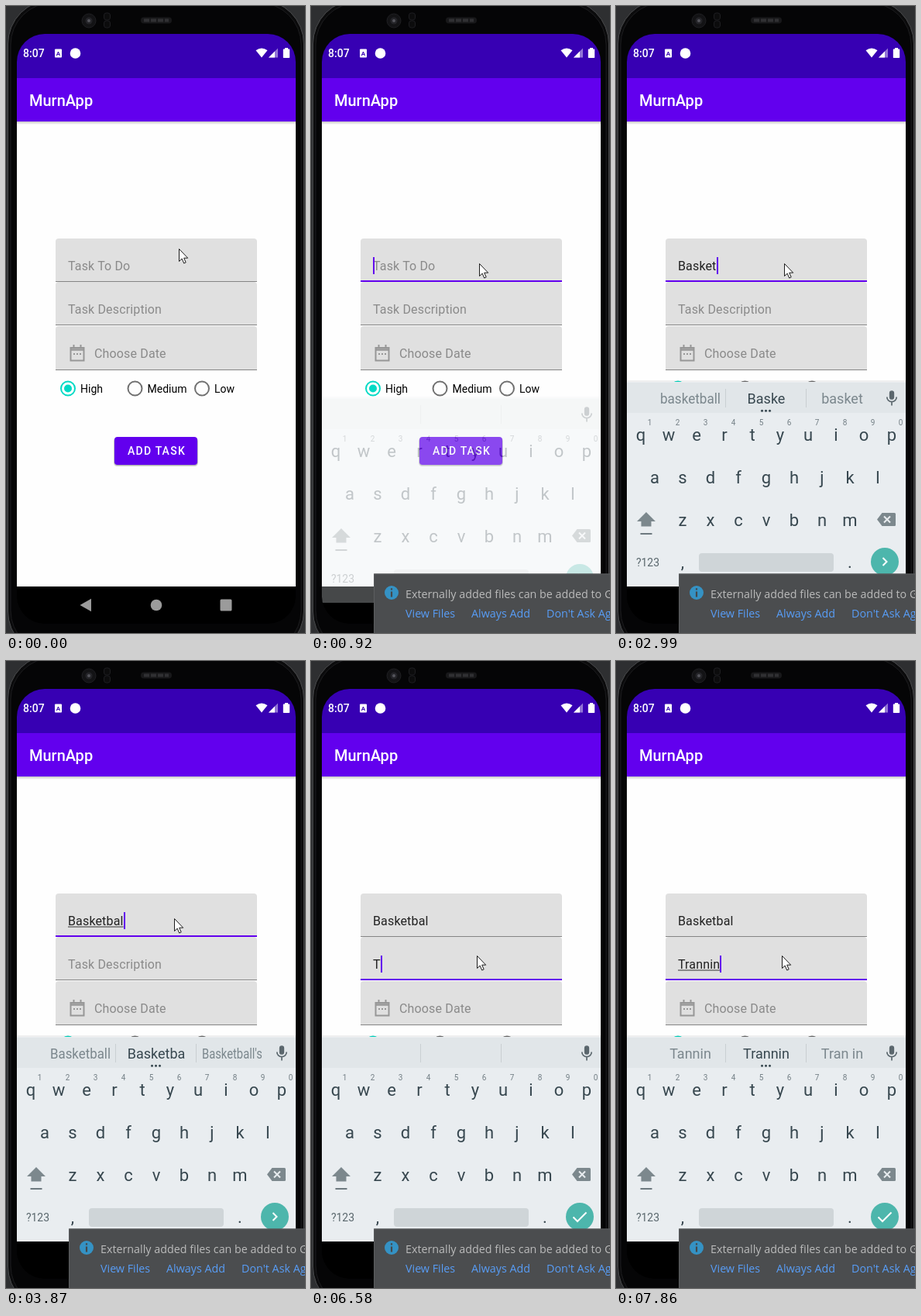
An HTML page that plays this animation: 386 px wide and 809 px high, repeating every 7990 ms.

```html
<!DOCTYPE html>
<html lang="en">
<head>
<meta charset="utf-8">
<title>Task form</title>
<style>
  html, body { margin: 0; width: 100%; height: 100%; overflow: hidden; background: #2b2c2e; }
  svg { display: block; width: 100vw; height: 100vh; font-family: Roboto, sans-serif; }
  text { white-space: pre; }
  .mid { text-anchor: middle; }
  .input { font-size: 16px; letter-spacing: .15px; }
  .hint { fill: #8a8a8a; }
  .typed { fill: #212121; }
  .label { font-size: 14px; fill: #000; }
  .key { font-size: 22px; fill: #37474f; }
  .digit { font-size: 10px; fill: #727e84; }
  .word { font-size: 18px; fill: #7b878d; }
  .notice { font: 14.3px "Open Sans", "Noto Sans", sans-serif; fill: #bbb; }
  .link { fill: #589df6; }
</style>
</head>
<body>
<svg viewBox="0 0 386 809" preserveAspectRatio="none">
  <defs>
    <linearGradient id="shade" x2="0" y2="1">
      <stop offset="0" stop-opacity=".22"/><stop offset="1" stop-opacity="0"/>
    </linearGradient>
    <clipPath id="screen"><rect x="14" y="36" width="360" height="761" rx="36"/></clipPath>
  </defs>

  <!-- phone body -->
  <rect width="386" height="809" fill="#2e2f31"/>
  <rect x="2.5" y="-8" width="382" height="846" rx="57" fill="#0b0b0c" stroke="#4b4c4e"/>
  <rect x="6" y="-4" width="375" height="838" rx="54" fill="#050506" stroke="#1d1d1f"/>
  <circle cx="107" cy="19" r="9" fill="#131315" stroke="#1f1f22"/>
  <circle cx="107" cy="19" r="4.5" fill="#242428"/>
  <circle cx="107" cy="19" r="2" fill="#55555c"/>
  <g fill="#0c0c0d" stroke="#1e1e21">
    <rect x="126.500" y="9" width="8" height="9" rx="3"/>
    <rect x="126.500" y="19" width="8" height="9" rx="3"/>
  </g>
  <rect x="174" y="14.500" width="40" height="8" rx="4" fill="#18181a"/>
  <path d="M178 18.500h32" stroke="#303033" stroke-width="4" stroke-dasharray="7 2"/>

  <g clip-path="url(#screen)">
    <rect x="14" y="36" width="360" height="761" fill="#000"/>
    <rect x="14" y="149" width="360" height="600" fill="#fefefe"/>
    <rect x="14" y="149" width="360" height="4" fill="url(#shade)"/>
    <rect x="14" y="36" width="360" height="57" fill="#3700b3"/>
    <rect x="14" y="93" width="360" height="56" fill="#6200ee"/>
    <g fill="#fff">
      <text x="22" y="66" font-size="14" font-weight="500">8:07</text>
      <rect x="63" y="55.500" width="9" height="11" rx="1"/>
      <circle cx="89.500" cy="61" r="6.800"/>
      <path d="M322.500 57.200Q330 51.800 337.500 57.200L330 66.500Z"/>
      <path d="M351 54.500V66.500H339Z" opacity=".45"/>
      <path d="M347 58.500V66.500H339Z"/>
      <path d="M360 54h4v1.500h1.500q.7 0 .7.800v10q0 .7-.7.700h-7q-.7 0-.7-.700v-10q0-.8.700-.800h1.500Z"/>
      <text x="30" y="129" font-size="20" font-weight="500">MurnApp</text>
    </g>
    <text x="67.500" y="64.200" class="mid" font-size="8" font-weight="700" fill="#3700b3">A</text>
    <g fill="#9b9b9b">
      <path d="M95.500 773L110 764.800V781.200Z"/>
      <circle cx="194" cy="773" r="7.300"/>
      <rect x="276.500" y="765.500" width="15" height="15" rx="1.500"/>
    </g>
    <g id="form"></g>
    <g id="keyboard">
      <rect x="14" y="483" width="360" height="3" fill="#000" opacity=".06"/>
      <rect x="14" y="485" width="360" height="264" fill="#e9edf0"/>
      <rect x="14" y="486" width="360" height="39" fill="#e1e6e9"/>
      <path d="M141.500 494V518M245.500 494V518" stroke="#c9cfd2"/>
      <g fill="none" stroke="#5b676d" stroke-width="1.700">
        <rect x="353.700" y="497" width="4.600" height="10" rx="2.300" fill="#5b676d"/>
        <path d="M349.800 504.500a6.200 6.200 0 0 0 12.400 0M356 511v4.500"/>
      </g>
      <g id="words"></g>
      <g id="keys"></g>
      <path d="M39 653L51 665H45.500V671.500H32.500V665H27Z" fill="#7c888d"/>
      <rect x="31.500" y="680" width="15" height="2" fill="#6d797f"/>
      <path d="M343.500 654H359.500q1.500 0 1.500 1.500V669.500q0 1.500-1.500 1.500H343.500L337 662.500Z" fill="#7c888d"/>
      <path d="M346 658.500l8 8m0-8l-8 8" stroke="#e9edf0" stroke-width="2"/>
      <rect x="107" y="706" width="174" height="24" rx="4" fill="#cfd5d8"/>
      <circle cx="347" cy="717" r="18" fill="#4db6ac"/>
      <path id="enter" fill="none" stroke="#fff" stroke-width="2"/>
    </g>
  </g>

  <g id="notice">
    <rect x="81" y="732.500" width="305" height="77" fill="#4b4d4f"/>
    <path d="M81.500 809V733H386" fill="none" stroke="#5b5d5f"/>
    <circle cx="104" cy="757" r="9" fill="#3592c4"/>
    <path d="M104 751.200v2.300M104 755.500v7" stroke="#45494c" stroke-width="2.200"/>
    <text class="notice" x="122" y="763.500">Externally added files can be added to Git</text>
    <text class="notice link" x="122" y="789">View Files</text>
    <text class="notice link" x="207" y="789">Always Add</text>
    <text class="notice link" x="304" y="789">Don't Ask Again</text>
  </g>
  <path id="mouse" d="M.5.500V16.500L4.200 13.100L6.700 19L9.200 17.900L6.700 12.200H11.700Z" fill="#fff" stroke="#1c1c1c"/>
</svg>

<script>
const LOOP = 7990;
const $ = id => document.getElementById(id);

function add(parent, tag, attrs, content = "") {
  const el = document.createElementNS("http://www.w3.org/2000/svg", tag);
  for (const k in attrs) el.setAttribute(k, attrs[k]);
  el.textContent = content;
  parent.append(el);
  return el;
}
const set = (el, attrs) => { for (const k in attrs) el.setAttribute(k, attrs[k]); };
const show = (el, on) => el.setAttribute("visibility", on ? "inherit" : "hidden");

// form
const form = $("form");

function box(y, height) {
  add(form, "path", {
    d: `M64 ${y + height}V${y + 4}q0-4 4-4H320q4 0 4 4V${y + height}Z`, fill: "#e0e0e0"
  });
}

function makeField(y, hint) {
  box(y, 56);
  add(form, "rect", { x: 64, y: y + 55, width: 260, height: 1, fill: "#858585" });
  return {
    focus: add(form, "rect", { x: 64, y: y + 54, width: 260, height: 2, fill: "#6200ee" }),
    hint: add(form, "text", { x: 80, y: y + 41, class: "input hint" }, hint),
    text: add(form, "text", { x: 80, y: y + 41, class: "input typed" }),
    under: add(form, "rect", { x: 80, y: y + 42.5, height: 1, fill: "#333" }),
    caret: add(form, "rect", { y: y + 24, width: 2, height: 22, fill: "#6200ee" })
  };
}

const task = makeField(300, "Task To Do");
const about = makeField(356, "Task Description");

box(413, 57);
add(form, "rect", { x: 64, y: 469, width: 260, height: 1, fill: "#858585" });
add(form, "text", { x: 114, y: 453.5, class: "input hint" }, "Choose Date");
add(form, "path", {
  d: "M83.500 441h17v16.500h-17zM87.500 437v4M96.500 437v4", fill: "none", stroke: "#979797", "stroke-width": 2
});
add(form, "path", {
  d: "M83 443.500h18M86.500 449h11", stroke: "#979797", "stroke-width": 2.4, "stroke-dasharray": "18 0"
}).setAttribute("d", "M83 443.500h18");
for (const x of [87, 91, 95]) add(form, "rect", { x, y: 448, width: 2, height: 2, fill: "#979797" });

[["High", 80], ["Medium", 166.5], ["Low", 253]].forEach(([name, cx], i) => {
  const color = i ? "#707070" : "#03dac5";
  add(form, "circle", { cx, cy: 493.5, r: 9, fill: "none", stroke: color, "stroke-width": 2 });
  if (!i) add(form, "circle", { cx, cy: 493.5, r: 5, fill: color });
  add(form, "text", { x: cx + 16, y: 499, class: "label" }, name);
});

for (const grow of [2, 1]) {
  add(form, "rect", {
    x: 140 - grow / 2, y: 557, width: 107 + grow, height: 35 + grow, rx: 4.5, opacity: .16
  });
}
add(form, "rect", { x: 140, y: 556, width: 107, height: 36, rx: 4, fill: "#6200ee" });
add(form, "text", {
  x: 157, y: 579, fill: "#fff", "font-size": 14, "font-weight": 500, "letter-spacing": 1.25
}, "ADD TASK");

// keyboard
const keys = $("keys");
[["qwertyuiop", 32, 561], ["asdfghjkl", 50, 616], ["zxcvbnm", 86, 671]].forEach(([row, x, y], r) => {
  [...row].forEach((c, i) => {
    add(keys, "text", { x: x + 36 * i, y, class: "key mid" }, c);
    if (!r) add(keys, "text", { x: 43.5 + 36 * i, y: 541, class: "digit mid" }, (i + 1) % 10);
  });
});
add(keys, "text", { x: 41, y: 722.5, class: "mid", "font-size": 14, fill: "#59666c" }, "?123");
add(keys, "text", { x: 86, y: 725, class: "key mid" }, ",");
add(keys, "text", { x: 302, y: 725, class: "key mid" }, ".");

const slots = [0, 1, 2].map(i => add($("words"), "text", { class: "word mid" }));
slots[1].style.fill = "#37474f";
const dots = add($("words"), "g", { fill: "#37474f" });
for (const cx of [188.5, 193.5, 198.5]) add(dots, "circle", { cx, cy: 522.3, r: 1.5 });

// timelines: [start, value], each value holds until the next start
const typedTask = [[0, ""], [1870, "B"], [2110, "Ba"], [2360, "Bas"], [2600, "Bask"], [2870, "Baske"],
  [2990, "Basket"], [3480, "Basketb"], [3750, "Basketba"], [3870, "Basketbal"]];
const typedAbout = [[0, ""], [6580, "T"], [6860, "Tr"], [6980, "Tra"], [7250, "Tran"],
  [7490, "Trann"], [7610, "Tranni"], [7740, "Trannin"]];
const offers = [[0, ""], [1990, "But B By"], [2230, "Bad Ba Back"], [2480, "Basic Bas Based"],
  [2720, "basketball Bask basket"], [2990, "basketball Baske basket"], [3110, "Basketball Basket Baskets"],
  [3600, "Basketball Basketb Basketball's"], [3870, "Basketball Basketba Basketball's"],
  [3990, "Basketball Basketbal Basketball's"], [5260, ""],
  [6710, "The T To"], [6980, "Try Tr Trust"], [7100, "Track Tra Training"], [7370, "Train Tran Transport"],
  [7610, "Train Trann Trans"], [7740, "Tannin Tranni Train"], [7860, "Tannin Trannin Tran_in"]];
const caretOn = [[0, 0], [660, 1], [1170, 0], [1730, 1], [4490, 0], [5010, 1], [5790, 0], [6190, 1]];
const focusIn = [[0, 0], [530, .4], [660, .8], [780, 1]];
const rise = [[0, null], [920, .3], [1050, .75], [1170, 1]];
const pointer = [[0, [223, 313]], [130, [220, 324]], [250, [217, 332]], [4360, [217, 340]],
  [4490, [216, 358]], [4610, [215, 372]], [4730, [214, 380]]];
const SWITCH = 5260;

function at(line, t) {
  let value = line[0][1];
  for (const [start, v] of line) if (t >= start) value = v;
  return value;
}

function drawField(f, text, focus, caret, marked) {
  f.text.textContent = text;
  const width = text ? f.text.getComputedTextLength() : 0;
  show(f.hint, !text);
  set(f.focus, { opacity: focus });
  set(f.under, { width });
  show(f.under, marked);
  set(f.caret, { x: 80 + Math.round(width) });
  show(f.caret, caret);
}

// long words are condensed to the slot width, as the keyboard does
function drawWords(line) {
  const words = line ? line.split(" ") : [];
  slots.forEach((slot, i) => {
    slot.textContent = (words[i] || "").replace("_", " ");
    const width = words[i] ? slot.getComputedTextLength() : 1;
    const scale = Math.min(1, 78 / width);
    set(slot, { transform: `translate(${96 + 98 * i} 513) scale(${scale} 1)` });
  });
  show(dots, words.length);
}

function draw(t) {
  const second = t >= SWITCH;
  const caret = at(caretOn, t);
  drawField(task, at(typedTask, t), second ? 0 : at(focusIn, t), caret && !second, t >= 3870 && !second);
  drawField(about, at(typedAbout, t), second ? 1 : 0, caret && second, t >= 7610);
  drawWords(at(offers, t));

  const up = at(rise, t);
  show($("keyboard"), up !== null);
  set($("keyboard"), { opacity: up || 0, transform: `translate(0 ${30 * (1 - up)})` });
  set($("enter"), { d: second ? "M338.500 717.500l5.500 5.500 11.500-11.500" : "M344.500 712l5 5-5 5" });

  show($("notice"), t >= 250);
  set($("mouse"), { transform: `translate(${at(pointer, t)})` });
}

function tick() {
  draw(performance.now() % LOOP);
  requestAnimationFrame(tick);
}
tick();
</script>
</body>
</html>
```
